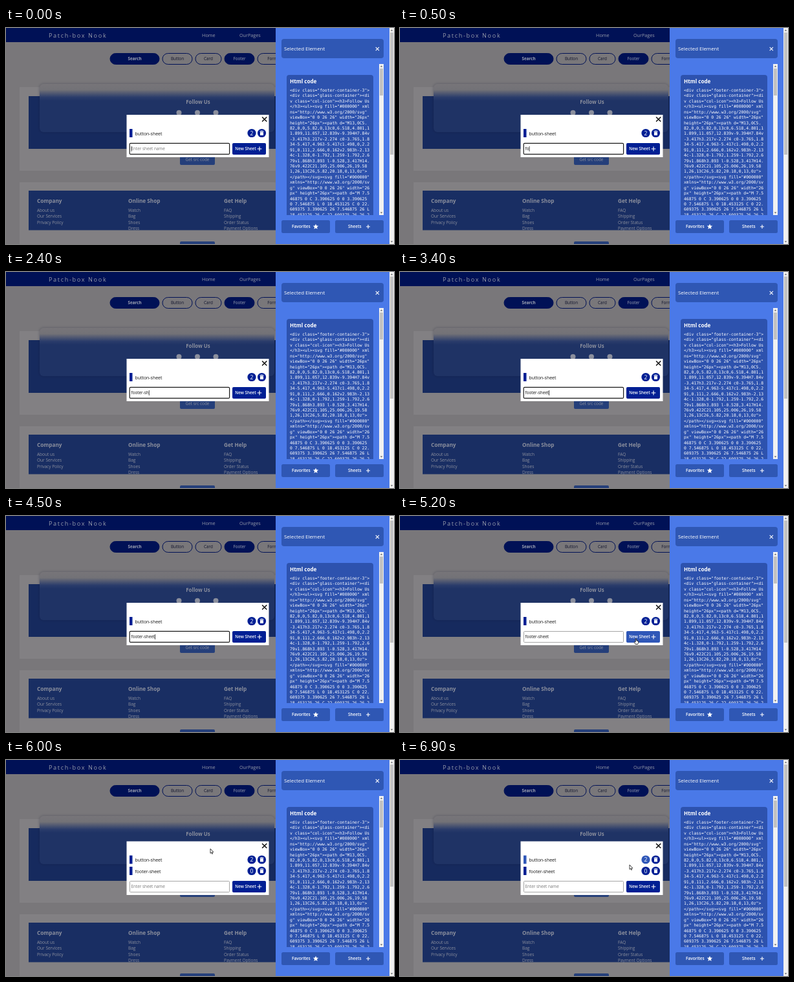
An HTML page with a canvas that plays this animation: 600 px wide and 336 px high, repeating every 7 s.

```html
<!DOCTYPE html>
<html lang="en">
<head>
<meta charset="utf-8">
<title>Component sheets</title>
<style>
  html, body { margin: 0; width: 100%; height: 100%; overflow: hidden; background: #79777a; }
  canvas { display: block; width: 600px; height: 336px; }
</style>
</head>
<body>
<canvas id="stage" width="600" height="336"></canvas>
<script>
const ctx = document.getElementById('stage').getContext('2d');
const LOOP = 7000, STEP = 100;
const SANS = '"Open Sans", "Noto Sans", sans-serif';
const MONO = '"DejaVu Sans Mono", "Liberation Mono", monospace';
const NAVY = '#001f94', HOVER = '#2f57b8', PANEL = '#4a79e8', BOX = '#2f57b4';
const DIM_PAGE = '#79777a', DIM_CARD = '#828083', DIM_NAVY = '#001156';
const DIM_BUTTON = '#253f7a', DIM_TEXT = '#8b8f9d';

const SHEET_NAME = 'footer-sheet';
const KEY_TIMES = [200, 400, 600, 800, 900, 1100, 1600, 1900, 2200, 2500, 2700, 3000];
const BLUR_AT = 5100, ADDED_AT = 5400;
const POINTER = [
  [4600, 232, 188], [5000, 364, 190], [5200, 365, 191], [5400, 365, 191],
  [6000, 316, 138], [6200, 317, 139], [6800, 355, 163], [7000, 355, 163]
];

const CODE = [
  '<div class="footer-container-3">',
  '<div class="glass-container"><di',
  'v class="col-icon"><h3>Follow Us',
  '</h3><ul><svg fill="#000000" xml',
  'ns="http://www.w3.org/2000/svg"',
  'viewBox="0 0 26 26" width="26px"',
  'height="26px"><path d="M13,0C5.',
  '82,0,0,5.82,0,13c0,6.518,4.801,1',
  '1.899,11.057,12.839v-9.394H7.84v',
  '-3.417h3.217v-2.274 c0-3.765,1.8',
  '34-5.417,4.963-5.417c1.498,0,2.2',
  '91,0.111,2.666,0.162v2.983h-2.13',
  '4c-1.328,0-1.792,1.259-1.792,2.6',
  '79v1.868h3.893 l-0.528,3.417H14.',
  '76v9.422C21.105,25.006,26,19.58',
  '1,26,13C26,5.82,20.18,0,13,0z">',
  '</path></svg><svg fill="#000000"',
  'xmlns="http://www.w3.org/2000/sv',
  'g" viewBox="0 0 26 26" width="26',
  'px" height="26px"><path d="M 7.5',
  '46875 0 C 3.390625 0 0 3.390625',
  '0 7.546875 L 0 18.453125 C 0 22.',
  '609375 3.390625 26 7.546875 26 L',
  '18.453125 26 C 22.609375 26 26 2'
];

function rect(x, y, w, h, color) {
  ctx.fillStyle = color;
  ctx.fillRect(x, y, w, h);
}

function round(x, y, w, h, r, fill, stroke, line = 1) {
  ctx.beginPath();
  ctx.roundRect(x, y, w, h, r);
  if (fill) { ctx.fillStyle = fill; ctx.fill(); }
  if (stroke) { ctx.strokeStyle = stroke; ctx.lineWidth = line; ctx.stroke(); }
}

function disc(x, y, r, color) {
  ctx.beginPath();
  ctx.arc(x, y, r, 0, Math.PI * 2);
  ctx.fillStyle = color;
  ctx.fill();
}

function lines(color, width, ...segments) {
  ctx.beginPath();
  for (const [x1, y1, x2, y2] of segments) {
    ctx.moveTo(x1, y1);
    ctx.lineTo(x2, y2);
  }
  ctx.strokeStyle = color;
  ctx.lineWidth = width;
  ctx.stroke();
}

function polygon(points, fill, stroke) {
  ctx.beginPath();
  points.forEach(([x, y]) => ctx.lineTo(x, y));
  ctx.closePath();
  ctx.fillStyle = fill;
  ctx.fill();
  if (stroke) { ctx.strokeStyle = stroke; ctx.lineWidth = 0.8; ctx.stroke(); }
}

// y is the middle of the lowercase letters
function text(str, x, y, size, color, { weight = 400, align = 'left', family = SANS, spacing = 0 } = {}) {
  ctx.font = `${weight} ${size}px ${family}`;
  ctx.textAlign = align;
  ctx.letterSpacing = spacing + 'px';
  ctx.fillStyle = color;
  ctx.fillText(str, x, y + size * 0.3);
}

function cross(x, y, r, color, width) {
  lines(color, width, [x - r, y - r, x + r, y + r], [x - r, y + r, x + r, y - r]);
}

function plus(x, y, r, color) {
  lines(color, 1.1, [x - r, y, x + r, y], [x, y - r, x, y + r]);
}

function pill(label, x, w, filled, weight = 400) {
  round(x, 39.5, w, 17, 8.5, filled && DIM_NAVY, DIM_NAVY);
  text(label, x + w / 2, 48.3, 6.3, filled ? '#a0a4b4' : '#10142c', { weight, align: 'center' });
}

function footerColumn(x, title, links) {
  text(title, x, 269.4, 8.2, DIM_TEXT, { weight: 700 });
  links.forEach((link, i) => text(link, x, 283.9 + i * 9.35, 6.5, DIM_TEXT));
}

function sourceButton(y) {
  round(269, y, 54, 16, 2, DIM_BUTTON);
  text('Get src code', 296, y + 8.3, 6.4, DIM_TEXT, { align: 'center' });
}

function drawPage() {
  rect(0, 0, 417, 336, DIM_PAGE);
  rect(0, 0, 417, 22, DIM_NAVY);
  text('Patch-box Nook', 66, 12, 9.1, '#969aaa', { spacing: 1.65 });
  text('Home', 303, 11.8, 7.3, '#969aaa');
  text('OurPages', 361, 11.8, 7.2, '#969aaa');

  pill('Search', 161, 76, true, 700);
  pill('Button', 242, 46, false);
  pill('Card', 293, 40, false);
  pill('Footer', 338, 46, true);
  pill('Form', 389, 46, false);

  rect(21, 92, 396, 130, DIM_CARD);
  rect(35, 106, 382, 82, '#162a5e');
  const glass = ctx.createLinearGradient(0, 87, 0, 113);
  glass.addColorStop(0, '#777579');
  glass.addColorStop(0.35, '#737277');
  glass.addColorStop(0.8, '#2a3c6b');
  glass.addColorStop(1, '#1f3365');
  ctx.save();
  ctx.shadowColor = 'rgba(10, 15, 40, .3)';
  ctx.shadowBlur = 4;
  round(52, 87, 363, 75, 6, glass);
  ctx.restore();
  text('Follow Us', 297, 115.5, 7.9, DIM_TEXT, { weight: 700, align: 'center' });
  for (const x of [267.5, 296, 324.5]) disc(x, 131.8, 4, DIM_TEXT);
  sourceButton(197);

  rect(21, 240, 396, 96, DIM_CARD);
  rect(35, 253, 382, 61.5, '#192e63');
  footerColumn(48, 'Company', ['About us', 'Our Services', 'Privacy Policy']);
  footerColumn(189, 'Online Shop', ['Watch', 'Bag', 'Shoes', 'Dress']);
  footerColumn(337, 'Get Help', ['FAQ', 'Shipping', 'Order Status', 'Payment Options']);
  sourceButton(332);
}

function scrollbar(x, y, w, h, thumb) {
  const mid = x + w / 2, end = y + h;
  rect(x, y, w, h, '#f1f1f1');
  rect(x + 1, y + 7, w - 2, thumb, '#c1c1c1');
  polygon([[mid - 1.8, y + 4.5], [mid, y + 2.5], [mid + 1.8, y + 4.5]], '#606060');
  polygon([[mid - 1.8, end - 4.5], [mid, end - 2.5], [mid + 1.8, end - 4.5]], '#606060');
}

function drawPanel() {
  rect(417, 0, 176, 336, PANEL);
  scrollbar(593, 0, 7, 336, 190);
  round(426, 17, 158, 30, 4, BOX);
  text('Selected Element', 430, 33, 7.9, '#fff', { weight: 500 });
  cross(574.3, 32.5, 2.6, '#fff', 1.1);

  round(434, 73, 134, 218, [4, 4, 0, 0], '#2d52ae');
  text('Html code', 439, 83.5, 8.1, '#fff', { weight: 700 });
  CODE.forEach((row, i) =>
    text(row, 439, 97 + i * 8.43, 6.4, '#fff', { family: MONO }));
  rect(434, 291, 134, 4, PANEL);
  scrollbar(577, 56, 7, 235, 42);

  round(426, 299, 75, 20, 2.5, BOX);
  round(509, 299, 75, 20, 2.5, BOX);
  text('Favorites', 442, 309, 6.5, '#fff', { weight: 600 });
  text('Sheets', 529, 309, 6.4, '#fff', { weight: 600 });
  plus(560, 309, 3, '#fff');
  const star = Array.from({ length: 10 }, (_, i) => {
    const a = i * Math.PI / 5 - Math.PI / 2, r = i % 2 ? 2 : 4.5;
    return [479 + r * Math.cos(a), 309.2 + r * Math.sin(a)];
  });
  polygon(star, '#fff');
}

function sheetRow(name, count, y, hovered) {
  const accent = hovered ? HOVER : NAVY;
  rect(191, y - 6.5, 4.5, 13, accent);
  text(name, 199.5, y + 1, 6.95, '#111');
  disc(380, y, 6.6, accent);
  text(count, 380, y + 0.9, 8.6, '#fff', { align: 'center' });
  disc(395.5, y, 6.6, NAVY);
  rect(393, y - 1.8, 5, 5.2, '#fff');
  rect(392.5, y - 3.3, 6, 1, '#fff');
  rect(394.5, y - 3.9, 2, 0.8, '#fff');
}

function drawInput(t, y) {
  const focused = t < BLUR_AT;
  const typed = t < ADDED_AT ? KEY_TIMES.filter(k => k <= t).length : 0;
  const value = SHEET_NAME.slice(0, typed);
  if (focused) round(191.2, y + 0.4, 154.4, 17, 1.5, '#fff', '#181818', 1.2);
  else round(191.5, y + 0.5, 154, 17, 1, '#fff', '#9a9a9a', 0.9);
  text(value || 'Enter sheet name', 193.5, y + 9.5, 6.35, value ? '#111' : '#777');
  const lastKey = typed ? KEY_TIMES[typed - 1] : -500;
  if (focused && (t - lastKey) % 1060 < 530) {
    const width = value ? ctx.measureText(value).width : 0;
    rect(193.7 + width, y + 5, 0.7, 8, '#000');
  }
}

function drawModal(t, mouse) {
  const added = t >= ADDED_AT;
  const top = added ? 126.5 : 135, height = added ? 83.5 : 66;
  const inputY = top + height - 22;
  const over = y => mouse && mouse.x > 187 && mouse.x < 406 && Math.abs(mouse.y - y) < 8.75;
  rect(186.5, top, 220, height, '#fff');
  cross(399.7, top + 7, 3.6, '#000', 1.4);

  const first = top + 28.5;
  sheetRow('button-sheet', '2', first, over(first));
  if (added) sheetRow(SHEET_NAME, '0', first + 17.5, over(first + 17.5));

  drawInput(t, inputY);
  const onButton = mouse && mouse.x > 350 && over(inputY + 9);
  round(350, inputY, 52, 18, 2, onButton ? HOVER : NAVY);
  text('New Sheet', 354.3, inputY + 9.2, 6.3, '#fff', { weight: 600 });
  plus(392, inputY + 9, 3.4, '#fff');
  return onButton;
}

function pointerAt(t) {
  const i = POINTER.findIndex(([time]) => time > t);
  if (i < 1) return null;
  const [t0, x0, y0] = POINTER[i - 1], [t1, x1, y1] = POINTER[i];
  const p = (t - t0) / (t1 - t0), e = p * p * (3 - 2 * p);
  return { x: x0 + (x1 - x0) * e, y: y0 + (y1 - y0) * e };
}

function drawPointer({ x, y }, hand, inInput) {
  const at = points => points.map(([dx, dy]) => [x + dx, y + dy]);
  if (inInput) {
    lines('#333', 0.8, [x, y - 4, x, y + 4]);
  } else if (hand) {
    polygon(at([[-0.7, 0], [0.7, 0], [0.9, 3], [3.7, 3.8], [3.5, 6.5], [2.7, 8.5],
      [-0.8, 8.5], [-2.8, 5.2], [-2, 4.4], [-0.8, 5.2]]), '#fff', '#111');
  } else {
    polygon(at([[0, 0], [0, 7.2], [1.6, 5.8], [2.7, 8.2], [3.7, 7.7], [2.7, 5.4], [4.8, 5.2]]), '#fff', '#111');
  }
}

function draw(t) {
  const mouse = pointerAt(t);
  drawPage();
  drawPanel();
  const onButton = drawModal(t, mouse);
  if (mouse) drawPointer(mouse, onButton, t < BLUR_AT && mouse.x < 346);
}

const start = performance.now();
function frame() {
  const elapsed = (performance.now() - start) % LOOP;
  draw(Math.floor(elapsed / STEP) * STEP);
  requestAnimationFrame(frame);
}
frame();
</script>
</body>
</html>
```
